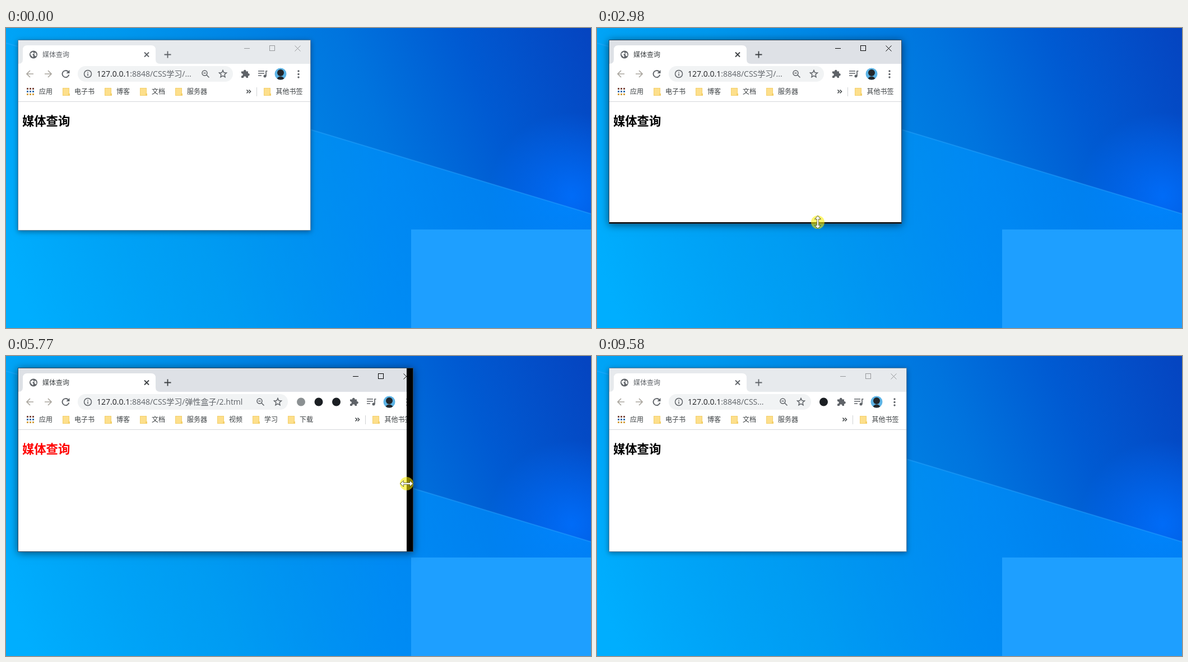
An HTML page with a canvas for the animation above (9.73 s loop, 1044 by 536 pixels).

```html
<!DOCTYPE html>
<html lang="zh-CN">
<head>
<meta charset="utf-8">
<title>媒体查询</title>
<style>
html, body { margin: 0; width: 100%; height: 100%; overflow: hidden; background: #0090f0; }
canvas { display: block; }
</style>
</head>
<body>
<canvas id="stage" width="1044" height="536"></canvas>
<script>
const g = document.getElementById('stage').getContext('2d');
const LOOP = 9730, LEFT = 22, TOP = 22;
const GREY = '#5f6368', CJK = '"Noto Sans CJK SC", "Noto Sans CJK", sans-serif';

// Each move eases out from wherever the last one ended; a dragged edge takes the pointer along
const START = { x: 588, y: 406, right: 543, bottom: 361, extras: 0 };
const MOVES = [
  { from: 70, to: 550, steps: 8, x: 389, y: 364, power: 1.2 },
  { from: 850, to: 1340, steps: 7, bottom: 252, x: 382, power: 4 },
  { from: 1800, to: 2265, steps: 7, bottom: 409, power: 4 },
  { from: 2342, to: 2500, steps: 3, bottom: 435 },
  { from: 2575, to: 2980, steps: 6, bottom: 349, x: 394 },
  { from: 3200, to: 3430, steps: 4, x: 569, y: 249 },
  { from: 3580, to: 3890, steps: 5, x: 544, y: 243 },
  { from: 4270, to: 4270, steps: 1, y: 235 },
  { from: 4440, to: 4517, steps: 2, right: 622, extras: .25, power: 1.35 },
  { from: 4594, to: 5290, steps: 10, right: 905, extras: 3 },
  { from: 5600, to: 5754, steps: 3, right: 726, y: 228, power: 2.5 },
  { from: 5831, to: 6140, steps: 5, right: 558, extras: 1 },
  { from: 6450, to: 6840, steps: 6, right: 661, extras: 3 },
  { from: 6990, to: 6990, steps: 1, right: 664 },
  { from: 7920, to: 7920, steps: 1, y: 219 },
  { from: 8090, to: 8480, steps: 6, right: 552, extras: 1 },
  { from: 8640, to: 8715, steps: 2, x: 914, y: 386 },
  { from: 8960, to: 8960, steps: 1, x: 1020, y: 523 }
];

const ICONS = {
  back: 'M6 0H-6M0-6L-6 0L0 6',
  forward: 'M-6 0H6M0-6L6 0L0 6',
  reload: 'M4.4-4A6 6 0 1 0 5.8 1.6',
  reloadTip: 'M7-7V-1H1z',
  info: 'M-6.5 0A6.5 6.5 0 1 1 6.5 0A6.5 6.5 0 1 1-6.5 0M0-.8V3.6M0-3.6V-2',
  zoom: 'M-6-1.5A4.5 4.5 0 1 1 3-1.5A4.5 4.5 0 1 1-6-1.5M2 2L6.5 6.5M-3.7-1.5H.7',
  star: 'M0-6.5L1.9-2.2L6.5-1.8L3 1.3L4 5.8L0 3.4L-4 5.8L-3 1.3L-6.5-1.8L-1.9-2.2z',
  puzzle: 'M-7-4.5H-3A2.3 2.3 0 1 1 1.5-4.5H5V-1A2.3 2.3 0 1 1 5 3.5V7H1.5A2.3 2.3 0 1 0-3 7H-7V3.5A2.3 2.3 0 1 0-7-1z',
  media: 'M-8-5H3M-8-1H3M-8 3H-2M6 4V-5H8.5',
  cross: 'M-4-4L4 4M4-4L-4 4',
  close: 'M-5-5L5 5M5-5L-5 5',
  plus: 'M-6 0H6M0-6V6',
  land: 'M-5.5-2L-1-5L1-2L-2 0L0 2L-1 5L-5 1zM2-4L5-2L5.5 2L3 3L1.5 0z',
  more: 'M-3.5-3L-.5 0L-3.5 3M.5-3L3.5 0L.5 3',
  resize: 'M0-11L4.5-6H1.2V6H4.5L0 11L-4.5 6H-1.2V-6H-4.5z',
  arrow: 'M0 0V12L3 9.5L5 14L7 13L5 8.8H9z'
};
for (const k in ICONS) ICONS[k] = new Path2D(ICONS[k]);

function blend(a, move, k) {
  const p = 1 - (1 - k / move.steps) ** (move.power || 2);
  const goal = { x: move.right, y: move.bottom, ...move };
  const out = {};
  for (const key in a) out[key] = a[key] + ((goal[key] ?? a[key]) - a[key]) * p;
  return out;
}

// Pose at time t, and the pose one step before it
function poses(t) {
  let now = START, old = START;
  for (const m of MOVES) {
    if (t < m.from) break;
    const step = (m.to - m.from) / (m.steps - 1) || 1;
    const k = Math.min(m.steps, 1 + Math.floor((t - m.from + 10) / step));
    const base = now;
    now = blend(base, m, k);
    old = t > m.to + 70 ? now : blend(base, m, k - 1);
  }
  return { now, old };
}

// Content is laid out one step late; the uncovered strip stays black
function edge(now, old) {
  now = Math.round(now);
  old = Math.round(old);
  return { now, layout: old, clip: old < now ? old : Math.max(now - 25, 2 * now - old) };
}

function box(x, y, w, h, color) {
  g.fillStyle = color;
  g.fillRect(x, y, w, h);
}

function disc(x, y, r, color) {
  g.fillStyle = color;
  g.beginPath();
  g.arc(x, y, r, 0, 7);
  g.fill();
}

function text(s, x, y, font, color) {
  g.font = font;
  g.fillStyle = color;
  g.fillText(s, x, y);
}

function icon(name, x, y, color, width) {
  g.save();
  g.translate(x, y);
  g.fillStyle = g.strokeStyle = color;
  if (width) { g.lineWidth = width; g.stroke(ICONS[name]); } else g.fill(ICONS[name]);
  g.restore();
}

function gradient(grad, ...stops) {
  stops.forEach(([p, c]) => grad.addColorStop(p, c));
  return grad;
}

function wallpaper() {
  box(0, 0, 1044, 536, gradient(g.createLinearGradient(0, 420, 1044, 0),
    [0, '#00aefe'], [.3, '#0098ee'], [.63, '#0074de'], [.8, '#005ad2'], [1, '#0544c0']));
  box(840, 130, 204, 340, gradient(g.createRadialGradient(1010, 300, 0, 1010, 300, 150),
    [0, 'rgba(0,112,255,.85)'], [1, 'rgba(0,112,255,0)']));
  const beam = new Path2D('M0 27L545 182L1044 332');
  const floor = new Path2D(beam);
  floor.lineTo(1044, 536);
  floor.lineTo(0, 536);
  g.fillStyle = gradient(g.createLinearGradient(0, 0, 1044, 0),
    [0, 'rgba(0,170,255,0)'], [.4, 'rgba(0,165,255,.3)'], [.65, 'rgba(0,148,255,.62)'], [1, 'rgba(0,145,255,.65)']);
  g.fill(floor);
  g.strokeStyle = 'rgba(50,170,255,.4)';
  g.lineWidth = 2;
  g.stroke(beam);
  box(723, 360, 321, 321, '#1e9fff');
}

function folder(x) {
  box(x - 6, 107, 12, 14, '#f3cf6b');
  box(x - 5, 108, 10, 12, '#fddf8b');
  box(x + 4, 117, 3, 4, '#f3cf6b');
}

function tabStrip(w, active) {
  const glyph = active ? '#3c4043' : GREY, ink = active ? '#000' : '#96989b';
  box(LEFT, TOP, w - LEFT, 42, active ? '#dee1e6' : '#e7eaed');
  g.fillStyle = '#fff';
  g.fill(new Path2D('M22 64Q30 64 30 56V39Q30 31 38 31H259Q267 31 267 39V56Q267 64 275 64z'));
  disc(49, 47.5, 7, GREY);
  icon('land', 49, 47.5, '#fff');
  text('媒体查询', 65, 52, '12px ' + CJK, glyph);
  icon('cross', 251, 47.5, glyph, 1.8);
  icon('plus', 288.5, 47.5, glyph, 1.8);
  box(w - 118, 36, 10, 1, ink);
  g.strokeStyle = ink;
  g.lineWidth = 1;
  g.strokeRect(w - 72.5, 31.5, 9, 9);
  icon('close', w - 22.5, 36.5, ink, 1);
}

function address(limit) {
  const host = '127.0.0.1', full = host + ':8848/CSS学习/弹性盒子/2.html';
  g.font = '14px "Open Sans", ' + CJK;
  const wide = s => g.measureText(s).width;
  let s = full;
  for (let n = full.length - 1; wide(s) > limit && n > host.length; n--) s = full.slice(0, n) + '...';
  text(host, 162, 87, g.font, '#202124');
  text(s.slice(host.length), 162 + wide(host), 87, g.font, GREY);
}

function extensions(x, count) {
  for (let i = 2; i >= 0; i--) {
    if (count > i) disc(x - 31.5 * Math.min(i + 1, count), 82, 7.5, i < 2 ? '#1b1f23' : '#8b9092');
  }
  icon('puzzle', x, 82, GREY);
}

function avatar(x) {
  g.save();
  g.beginPath();
  g.arc(x, 82, 10.5, 0, 7);
  g.clip();
  box(x - 11, 71, 22, 22, '#5db4e6');
  disc(x, 80, 6, '#22272c');
  disc(x, 94, 7.5, '#22272c');
  g.restore();
}

function toolbar(w, extras) {
  box(LEFT, 64, w - LEFT, 68, '#fff');
  icon('back', 43, 82, '#aaa69f', 1.7);
  icon('forward', 75, 82, '#aaa69f', 1.7);
  icon('reload', 106.5, 82, GREY, 1.9);
  icon('reloadTip', 106.5, 82, GREY);
  const end = w - 138 - 32 * extras;
  g.fillStyle = '#f1f3f4';
  g.beginPath();
  g.roundRect(128, 68, end - 128, 28, 14);
  g.fill();
  icon('info', 146, 82, GREY, 1.5);
  address(end - 72 - 162);
  icon('zoom', end - 49, 82, GREY, 1.5);
  icon('star', end - 18, 82, GREY, 1.5);
  extensions(w - 116, extras);
  icon('media', w - 85, 82, GREY, 1.7);
  disc(w - 81, 86, 2.5, GREY);
  avatar(w - 53);
  for (let y = 77; y <= 88; y += 5.5) disc(w - 21, y, 1.7, GREY);
}

function bookmarks(w) {
  const font = '12px ' + CJK, ink = '#3c4043';
  ['#7d4a40', '#2f6fae', '#d2a040'].forEach((color, row) => {
    for (let col = 0; col < 3; col++) box(37 + col * 5, 107 + row * 5, 3, 3, color);
  });
  text('应用', 59, 118, font, ink);
  let x = 107;
  for (const name of ['电子书', '博客', '文档', '服务器', '视频', '学习', '下载']) {
    const size = name.length * 12;
    if (x + 15 + size > w - 140) break;
    folder(x);
    text(name, x + 15, 118, font, ink);
    x += size + 39;
  }
  icon('more', w - 110, 113.5, ink, 1.5);
  box(w - 96, 106, 1, 16, '#d0d2d5');
  folder(w - 77);
  text('其他书签', w - 61.5, 118, font, ink);
  box(LEFT, 131, w - LEFT, 1, '#d5d7da');
}

function browser(r, b, extras, active) {
  g.save();
  g.shadowColor = active ? 'rgba(0,0,0,.55)' : 'rgba(0,0,0,.4)';
  g.shadowBlur = active ? 14 : 9;
  g.shadowOffsetY = 2;
  box(LEFT - 1, TOP - 1, r.now - LEFT + 2, b.now - TOP + 2, active ? '#2f4a60' : '#5b7f9d');
  g.restore();
  box(LEFT, TOP, r.now - LEFT, b.now - TOP, '#000');
  g.save();
  g.beginPath();
  g.rect(LEFT, TOP, r.clip - LEFT, b.clip - TOP);
  g.clip();
  box(LEFT, TOP, r.clip - LEFT, b.clip - TOP, '#fff');
  tabStrip(r.layout, active);
  toolbar(r.layout, extras);
  bookmarks(r.layout);
  // The page's media query: red in a wide viewport
  const wide = (r.clip - LEFT) / (b.clip - 132) > 2.8;
  text('媒体查询', 29, 173.5, 'bold 21.3px ' + CJK, wide ? '#f00' : '#000');
  g.restore();
}

// While dragging, the pointer runs a little ahead of the edge
const lead = e => e.now > e.layout ? 6 : e.clip - e.now;

function pointer(t, x, y) {
  if (t < 70 || t >= 8780 && t < 8960 || t >= 9250) return;
  const sizing = t >= 480 && t < 3200 || t >= 3800 && t < 8640;
  const shape = ICONS[sizing ? 'resize' : 'arrow'];
  disc(x, y, 12, 'rgba(255,240,0,.57)');
  g.save();
  g.translate(x, y);
  if (sizing && t > 3200) g.rotate(Math.PI / 2);
  g.strokeStyle = '#40431c';
  g.lineWidth = 1.4;
  g.stroke(shape);
  g.fillStyle = '#fff';
  g.fill(shape);
  g.restore();
}

const start = performance.now();
function draw(time) {
  const t = Math.max(0, time - start) % LOOP;
  const { now, old } = poses(t);
  const r = edge(now.right, old.right), b = edge(now.bottom, old.bottom);
  wallpaper();
  browser(r, b, now.extras, t >= 850 && t < 9580);
  pointer(t, now.x + lead(r), now.y + lead(b));
  requestAnimationFrame(draw);
}
draw(start);
</script>
</body>
</html>
```
